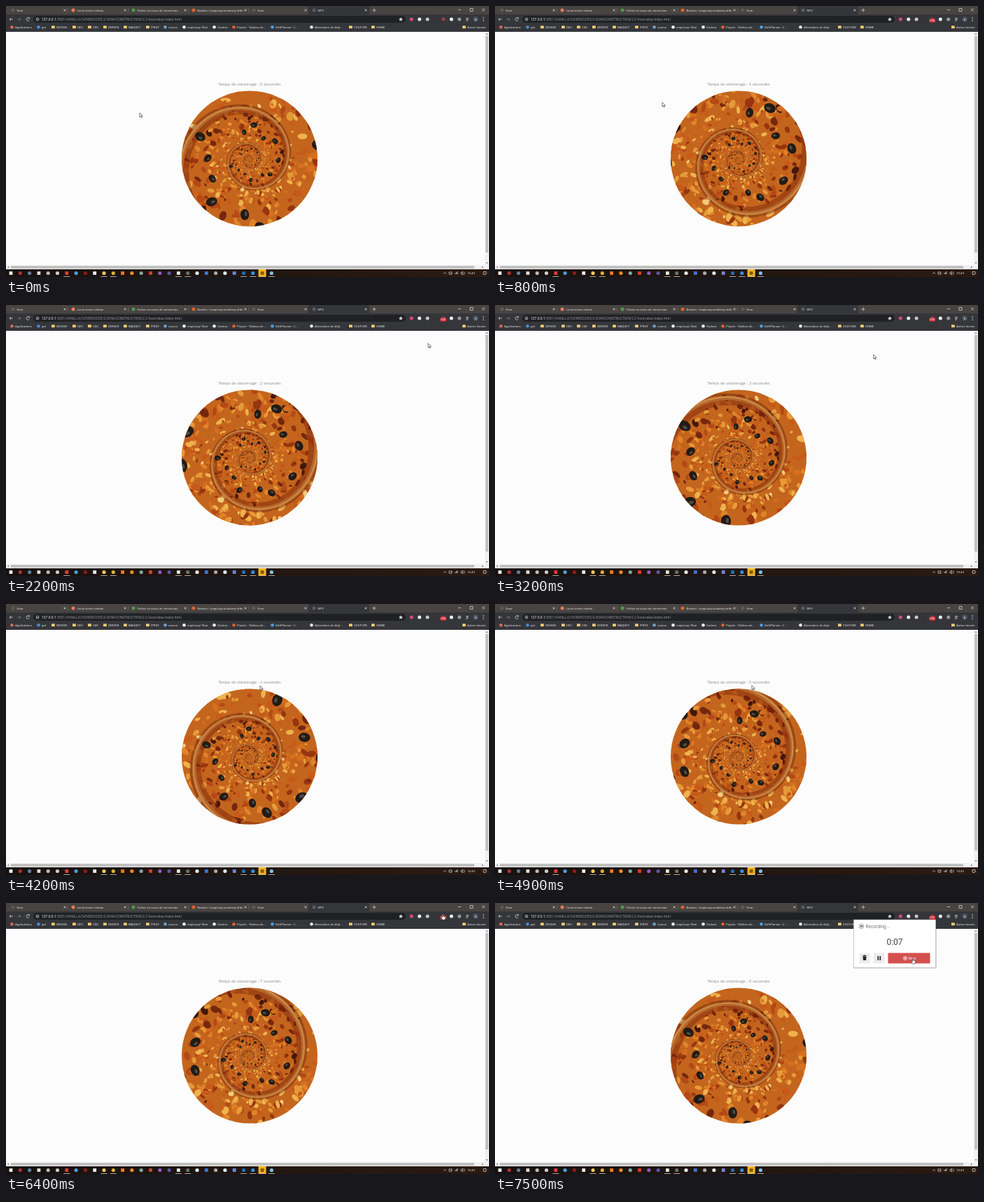
An HTML page with a canvas that plays this animation: 690 by 388 pixels, repeating every 7600 ms.

```html
<!DOCTYPE html>
<html lang="fr">
<head>
<meta charset="utf-8">
<title>NPV</title>
<style>
html, body { margin: 0; width: 100%; height: 100%; overflow: hidden; background: #fcfcfc; }
#stage { position: relative; width: 690px; height: 388px; overflow: hidden; }
svg, canvas { position: absolute; left: 0; top: 0; display: block; }
canvas { left: 248px; top: 118px; }
text { font-family: Roboto, "Open Sans", sans-serif; font-size: 4.3px; fill: #e4e4e4; }
.title { font-family: Lato, sans-serif; font-weight: 300; font-size: 6.15px; fill: #444; text-anchor: middle; }
.line { fill: none; stroke: #d0d0d0; stroke-width: .8; }
.mid { text-anchor: middle; }
</style>
</head>
<body>
<div id="stage">
  <svg width="690" height="388" viewBox="0 0 690 388">
    <linearGradient id="bar"><stop stop-color="#17110f"/><stop offset="1" stop-color="#2a1b12"/></linearGradient>
    <rect width="690" height="388" fill="#fcfcfc"/>
    <rect width="690" height="13" fill="#484441"/>
    <path d="M432 12V2q0-2 2-2h83q2 0 2 2v10z" fill="#35363a"/>
    <rect y="12" width="690" height="25" fill="#35363a"/>
    <rect x="39" y="14" width="532" height="10" rx="5" fill="#202124"/>
    <g id="tabs"></g>
    <path class="line" d="M523.5 6h5M526 3.500v5M646 5.500h4M663 3.500h4v4h-4zM680 3.500l4 4M684 3.500l-4 4"/>
    <path class="line" d="M10 19H5l2-2m-2 2l2 2M33 17.500a2.300 2.300 0 1 0 .3 2.500M33.300 16v2h-2"/>
    <path class="line" stroke-opacity=".45" d="M16 19h5l-2-2m2 2l-2 2"/>
    <circle cx="45" cy="19" r="1.900" class="line"/>
    <path class="line" d="M45 18.700v1.300"/>
    <text x="51" y="20.700" style="font-size:4.98px;fill:#92959a"><tspan fill="#f2f2f2">127.0.0.1</tspan>:5501/VANILLA/5-EXERCICES/2-DOM-CONSTRUCTION/2.2-food-relax/index.html</text>
    <path d="M564 16l.9 2 2.100.2-1.600 1.400.5 2.100-1.900-1.100-1.900 1.100.5-2.100-1.600-1.400 2.100-.2z" fill="#ddd"/>
    <g id="tools"></g>
    <path class="line" d="M657 17.500h4M657 19.200h4M657 21h3"/>
    <text class="mid" x="671" y="20.600">B</text>
    <path d="M682 16v6" stroke="#ddd" stroke-width="1.200" stroke-dasharray="1.200"/>
    <g id="marks"></g>
    <rect x="684" y="37" width="6" height="340" fill="#f1f1f1"/>
    <rect x="685" y="43" width="4" height="310" fill="#c1c1c1"/>
    <rect y="371" width="684" height="6" fill="#f1f1f1"/>
    <rect x="7" y="372" width="662" height="4" fill="#c1c1c1"/>
    <path d="M2 374l2-1.500v3zM682 374l-2-1.500v3zM687 39l1.500 2h-3zM687 369l1.500-2h-3z" fill="#777"/>
    <rect y="377" width="690" height="11" fill="url(#bar)"/>
    <g id="tasks"></g>
    <path class="line" d="M625 383.500l2-2 2 2M633 381h4v3h-4zM642 384v-2m1.500 2v-3m1.500 3v-4M650 381.500v2h1l1.500 1.500v-5l-1.500 1.500zM654.500 380.500q1.500 2 0 4M682 380.500h4v3.500h-2l-1 1v-1h-1z"/>
    <text class="mid" x="664.500" y="384.200">10:49</text>
    <text id="count" class="title" x="348" y="114.200"></text>
  </svg>
  <canvas id="pizza" width="200" height="200"></canvas>
  <svg width="690" height="388" viewBox="0 0 690 388">
    <g id="badge">
      <rect x="620.500" y="18.500" width="8.500" height="5" rx=".8" fill="#e0303a"/>
      <text id="badgeTime" class="mid" x="624.700" y="22.400" style="font-size:3.300px;fill:#fff"></text>
    </g>
    <g id="popup">
      <rect x="512" y="24" width="119" height="70" fill="#000" opacity=".15"/>
      <rect x="512.500" y="24" width="117" height="68.500" fill="#fff" stroke="#bbb" stroke-width=".7"/>
      <circle cx="523.500" cy="33.300" r="3.300" fill="none" stroke="#777" stroke-width=".7"/>
      <rect x="521.700" y="32" width="3.600" height="2.600" fill="#777"/>
      <text x="529.500" y="35.700" style="font-size:6.500px;fill:#777">Recording...</text>
      <text id="timer" class="mid" x="571" y="59.500" style="font-size:12px;fill:#444"></text>
      <path d="M520.500 71.500h15v15h-15zM541 71.500h15.500v15H541z" fill="#ececec"/>
      <path d="M525.500 76.800h5l-.5 5.200h-4zM525 75.200h6v1h-6zM527 74.500h2v1h-2zM546.500 76h1.600v6h-1.600zM549.500 76h1.600v6h-1.600z" fill="#222"/>
      <rect x="561.500" y="71.500" width="60" height="15" fill="#d4504e"/>
      <circle cx="586" cy="79" r="2.600" fill="none" stroke="#fff" stroke-width=".7"/>
      <rect x="584.900" y="77.900" width="2.200" height="2.200" fill="#fff"/>
      <text x="590.500" y="81" style="font-size:5.200px;fill:#fff">Stop</text>
    </g>
    <path id="arrow" d="M0 0v6l1.400-1.200 1 2.100 1-.5-1-2h1.900z" fill="#fff" stroke="#222" stroke-width=".6"/>
    <path id="hand" d="M-.7-2.500q.7-.8 1.300 0V0l2.500.7q.8.4.6 1.400L3 5H-.6L-2.300 2.100q0-1 1.600 0z" fill="#fff" stroke="#222" stroke-width=".6"/>
  </svg>
</div>
<script>
const $ = id => document.getElementById(id);
const NS = 'http://www.w3.org/2000/svg';

function add(parent, tag, attrs, label) {
  const el = document.createElementNS(NS, tag);
  for (const key in attrs) el.setAttribute(key, attrs[key]);
  if (label) el.textContent = label;
  $(parent).append(el);
}
const dot = (parent, cx, cy, r, fill) => add(parent, 'circle', { cx, cy, r, fill });
const box = (parent, x, y, width, height, fill) => add(parent, 'rect', { x, y, width, height, fill });

const tabs = [
  ['Error', '#5b5a59'], ['Local screen videos', '#e8795a'], ['Fichier en cours de conversion', '#4c9b4a'],
  ['Bastien / mapLoop-academy-référ', '#e2602c'], ['Error', '#5b5a59'], ['NPV', '#5b5c60']
];
tabs.forEach(([label, color], i) => {
  const x = 10 + i * 86;
  dot('tabs', x, 6, 2.5, color);
  add('tabs', 'text', { x: x + 5.5, y: 7.5 }, label);
  add('tabs', 'path', { class: 'line', d: `M${x + 72.5} 4.500l3 3m0-3l-3 3` });
  if (i < 4) box('tabs', x + 78, 3, .5, 6, '#77736f');
});

const folder = '#f0cc72';
const marks = [
  [13, 'Applications', '#d8695a'], [51, 'get', '#3f8ee0'], [72, 'DESIGN', folder], [102, 'DEV', folder],
  [124, 'CSS', folder], [146, 'SERVER', folder], [175, 'MAQUET', folder], [207, '!PROF', folder],
  [232, 'courva', '#6f9fca'], [259, 'mapLoop | Nori', '#f4f4f4'], [302, 'Codevo', '#f4f4f4'],
  [330, 'Projets - Tableau de...', '#e2602c'], [385, 'DriftPlanner - L\'...', '#4da0df'],
  [441, 'Attestation de dépl...', '#e8e8f0'], [497, 'COUTURE', folder], [529, 'HOME', folder],
  [659, 'Autres favoris', folder]
];
for (const [x, label, color] of marks) {
  if (color === folder) box('marks', x - 7, 28.3, 4.8, 3.8, color);
  else dot('marks', x - 4.5, 30.2, 2.3, color);
  add('marks', 'text', { x, y: 31.8 }, label);
}

const tools = ['#d94b79', '#eeeeee', '#c9c9c9', '#3a3035', '#9b4145', '#f2f2f2', '#9a9b9e'];
tools.forEach((color, i) => dot('tools', 579.3 + i * 11.4, 19, 2.5, color));
dot('tools', 671, 19, 3.7, '#4c5665');

const tasks = ('#eee #a33 #5d7fa0 #ddd #bbb #ccc #e23b36 #4aa0d8 #8c1c1c #eee #f0c75e #d9b13a #ef7a2c #f08a24 ' +
  '#7fa8a0 #dd3b31 #8d5bc2 #5a55a8 #d9ecdf #63756c #e9e9e9 #3d74d8 #aaa #dce6f2 #7188d9 #1f6fb4 #3390dc #7d5a12 #7fc0e8').split(' ');
tasks.forEach((color, i) => {
  const x = 7 + i * 13.3;
  if (i === 27) box('tasks', x - 5.5, 377, 11, 11, '#f5b51c');
  if (i % 3) dot('tasks', x, 382.5, 2.6, color);
  else box('tasks', x - 2.4, 380.1, 4.8, 4.8, color);
  if ([6, 10, 11, 18, 19, 25, 26, 27, 28].includes(i)) box('tasks', x - 4.5, 387, 9, 1, '#b9a894');
});

// The picture repeats when grown by e^GROW and turned by TURN.
const TAU = 2 * Math.PI, GROW = 1.02, TURN = .787, PITCH = GROW / (TAU - TURN);
const ctx = $('pizza').getContext('2d');

let seed = 11;
const rand = () => (seed = seed * 16807 % 2147483647) / 2147483647;

// 0 just inside the crust, 1 at the crust of the next turn inwards.
function depth(r, a) {
  const turns = (Math.log(75 / r) / PITCH - a - Math.PI / 2) / TAU;
  return turns - Math.floor(turns);
}

// Dark sauce to pale cheese.
const tones = ['#431809', '#74270d', '#96350f', '#b44816', '#c75a19', '#d66f1e', '#e08429', '#e59a38', '#efb24d', '#f3cc7c'];
const blobs = Array.from({ length: 420 }, () => {
  const r = 33.5 * Math.exp(GROW * rand()), a = rand() * TAU;
  const size = r * (.025 + .06 * rand());
  const tone = Math.floor((.68 * rand() + .32 * depth(r, a)) * tones.length);
  return { r, a, w: size, h: size * (.4 + .4 * rand()), tilt: rand() * TAU, color: tones[tone] };
});
const olives = [[50, -83], [40, -101], [36.5, -57], [45, -36], [41, 1], [36, 36],
  [79, 95], [81, 132], [60, 153], [60, 182], [78, 205]]
  .map(([r, deg], i) => ({ r, a: deg * Math.PI / 180, w: r * .1, h: r * .078, tilt: i * 1.3 }));

function oval(r, a, w, h, tilt, color) {
  ctx.fillStyle = color;
  ctx.beginPath();
  ctx.ellipse(r * Math.cos(a), r * Math.sin(a), w, h, tilt, 0, TAU);
  ctx.fill();
}

function eachLevel(draw) {
  for (let n = 1; n >= -3; n--) {
    ctx.save();
    ctx.rotate(n * TURN);
    ctx.scale(Math.exp(n * GROW), Math.exp(n * GROW));
    draw();
    ctx.restore();
  }
}

function band(outer, inner, color) {
  const point = (phi, k) => {
    const r = 75 * k * Math.exp(-PITCH * phi);
    ctx.lineTo(r * Math.sin(phi), -r * Math.cos(phi));
  };
  ctx.fillStyle = color;
  ctx.beginPath();
  for (let phi = -4; phi <= 25; phi += .1) point(phi, outer);
  for (let phi = 25; phi >= -4; phi -= .1) point(phi, inner);
  ctx.fill();
}

function drawPizza(t) {
  const zoom = t * .000683 % GROW;
  ctx.clearRect(0, 0, 200, 200);
  ctx.save();
  ctx.beginPath();
  ctx.arc(100, 100.5, 97, 0, TAU);
  ctx.clip();
  ctx.fillStyle = '#c4651e';
  ctx.fillRect(0, 0, 200, 200);
  ctx.translate(100, 102);
  ctx.rotate(zoom * TURN / GROW);
  ctx.scale(Math.exp(zoom), Math.exp(zoom));
  eachLevel(() => blobs.forEach(b => oval(b.r, b.a, b.w, b.h, b.tilt, b.color)));
  band(1.04, 1, 'rgba(90,32,8,.4)');
  band(.94, .85, 'rgba(115,30,8,.45)');
  band(1, .93, '#b4662a');
  band(.99, .965, '#cd8a48');
  eachLevel(() => olives.forEach(o => {
    oval(o.r, o.a, o.w, o.h, o.tilt, '#211b16');
    oval(o.r * .985, o.a - .02, o.w * .4, o.h * .3, o.tilt, '#514a40');
  }));
  ctx.restore();
}

const path = [[0, 191, 153], [800, 239, 138], [2200, 603, 55], [2700, 603, 55], [4200, 363, 117],
  [5500, 370, 116], [6300, 624, 19], [6700, 624, 19], [7300, 597, 82], [7600, 597, 82]];
function cursorAt(t) {
  const i = path.findIndex(p => p[0] > t);
  const [t0, x0, y0] = path[i - 1], [t1, x1, y1] = path[i];
  const u = (t - t0) / (t1 - t0), e = u * u * (3 - 2 * u);
  return [x0 + (x1 - x0) * e, y0 + (y1 - y0) * e];
}

const show = (id, on) => $(id).style.display = on ? '' : 'none';

function draw(t) {
  const [x, y] = cursorAt(t);
  const pointing = t >= 6300;
  drawPizza(t);
  $('count').textContent = `Temps de visionnage : ${Math.floor((t + 700) / 1000)} secondes`;
  $('timer').textContent = $('badgeTime').textContent = '0:0' + Math.floor(t / 1000);
  show('badge', t >= 100);
  show('popup', t >= 6700);
  show('arrow', !pointing);
  show('hand', pointing);
  $(pointing ? 'hand' : 'arrow').setAttribute('transform', `translate(${x} ${y})`);
}

const start = performance.now();
let shown = -1;
function tick() {
  const t = Math.floor((performance.now() - start) % 7600 / 100) * 100;
  if (t !== shown) draw(shown = t);
  requestAnimationFrame(tick);
}
tick();
</script>
</body>
</html>
```
